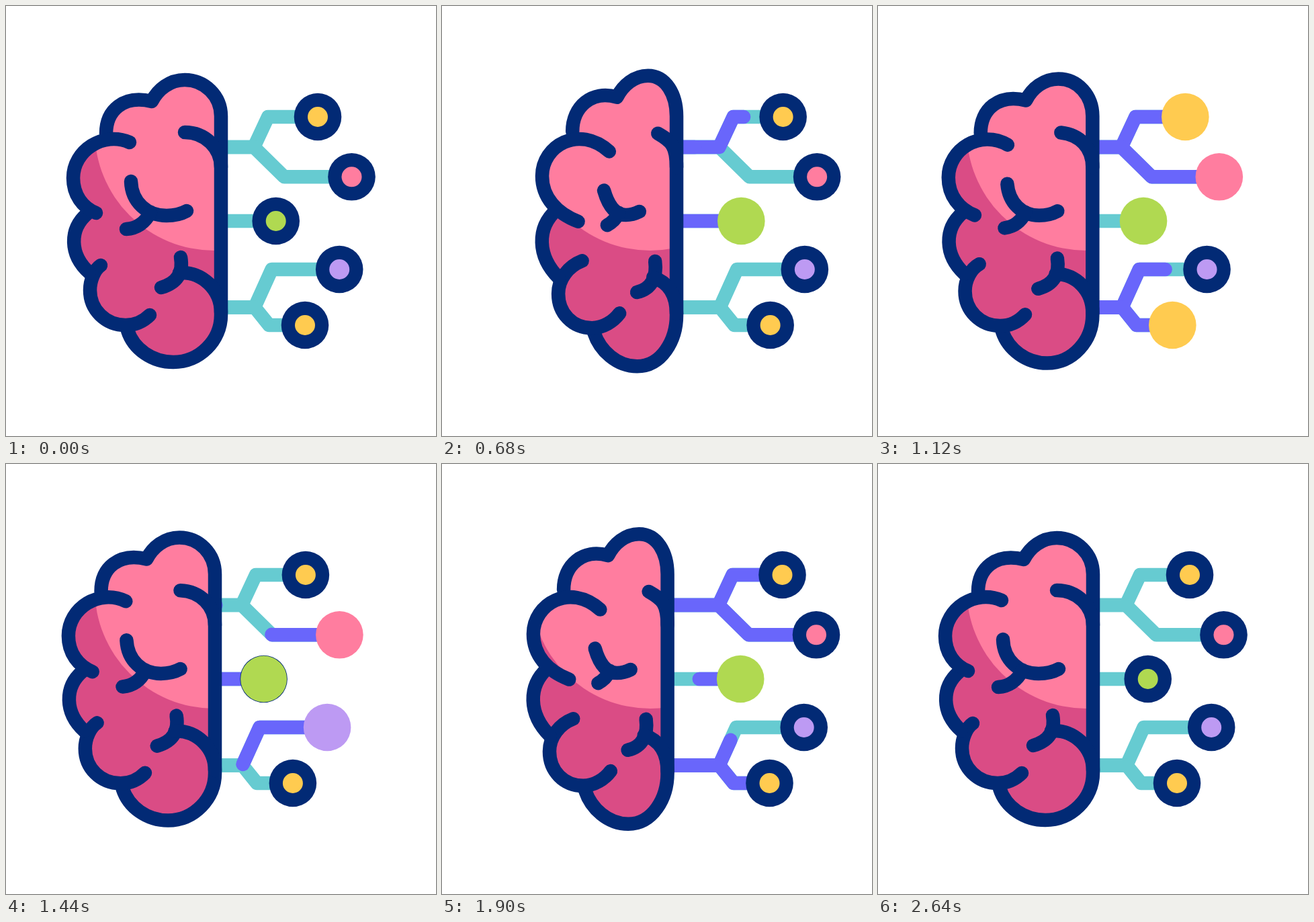
Animation, 640 px wide and 640 px high, one loop 2.7 s. Source, as an HTML page with a canvas:

```html
<!DOCTYPE html>
<html lang="en">
<head>
<meta charset="utf-8">
<title>Brain circuit</title>
<style>
  html, body { margin: 0; width: 100%; height: 100%; overflow: hidden; background: #fff; }
  canvas { display: block; width: 100vmin; height: 100vmin; }
</style>
</head>
<body>
<canvas id="stage" width="640" height="640"></canvas>
<script>
const ctx = document.getElementById('stage').getContext('2d');
const LOOP = 2700, PULSE_GAP = 870, LINE = 20.5;
const NAVY = '#022a75', TEAL = '#66cbd1', PURPLE = '#6966fb';
const PINK = '#ff7d9f', DARK_PINK = '#da4c85', YELLOW = '#ffcb50';

// Each stroke in three poses (rest, tall, narrow), with the spine at x = 320.
// The first four follow one another clockwise around the outline.
const strokes = [
  ['M149 190C149 155 175 132 217 142C226 124 244 110 266 110C296 110 320 134 320 164L320 460C320 498 288 530 249 530C218 530 190 511 181 483',
   'M136.5 180C136 146 162 116 209.5 127C219 108 237 93.5 261 93.5C289 93.5 320 132 320 164L320 460C320 495 286 546.5 242 546.5C210 546.5 178 521 171 492',
   'M166 187C166 150 195 125 232 136C241 118 258 104 278 104C305 104 320 132 320 164L320 460C320 498 298 536 262 536C232 536 207 513 198 486'],
  ['M214 460C204 470 193 475 178 475C148 475 125 452 125 423C125 408 132 392 141 386',
   'M208.5 469C198 480 182 487 165.5 487C136 487 112.5 463 112.5 433C112.5 415 121 398 135.5 388',
   'M236 457C227 469 212 479 195 479C166 479 145 457 145 428C145 406 160 387 181 379'],
  ['M124 397C94 370 94 332 121 309',
   'M111 406C80 375 80 330 106 302',
   'M146 405C113 372 113 330 142 304'],
  ['M134 308C114 300 100 281 100 256C100 215 145 186 184 203',
   'M128.5 312C103 302 86 277 86 250C86 206 138 175 181.5 200',
   'M175 321C143 309 121 285 121 253C121 208 176 176 221 217'],
  ['M266 188C297 188 320 212 320 240',
   'M265.5 179C294 183 320 206 320 240',
   'M293 190C313 202 320 208 320 240'],
  ['M186 261C187 292 210 312 239 312C250 312 260 310 269 305',
   'M180 261C183 292 204 312 231.5 312C242 312 251 309 259.5 304',
   'M213 275C219 295 228 311 245 311C252 311 259 309 265 306'],
  ['M215 307C207 323 194 331 179 332',
   'M211 307C204 322 192 330 176 331',
   'M235 308C231 316 225 322 218 326'],
  ['M260 374C264 397 255 412 231 419',
   'M259.5 379C263 404 254 421 229.5 429',
   'M289 380C292 403 284 421 262 426'],
  ['M258 397C292 395 320 422 320 456',
   'M258 405C295 409 320 428 320 460',
   'M286 404C308 411 320 430 320 458']
];
const NUMBER = /[\d.]+/g;
const morphs = strokes.map(poses => ({
  shape: poses[0],
  values: poses.map(path => path.match(NUMBER).map(Number))
}));

// Wires end in a node; grow, light, fade and dim are [start, end] times of a pulse.
const wires = [
  { points: [[290, 210], [369, 210], [390, 165], [464, 165]], color: YELLOW,
    grow: [482, 789], light: [1040, 1110], fade: [1200, 1360], dim: [1340, 1420] },
  { points: [[290, 210], [369, 210], [414, 254.3], [514.5, 254.3]], color: PINK,
    grow: [600, 900], light: [1040, 1110], fade: [1365, 1500], dim: [1500, 1580] },
  { points: [[290, 320], [401.7, 320]], color: '#b0d951',
    grow: [360, 540], light: [500, 580], fade: [960, 1110], dim: [1140, 1220] },
  { points: [[290, 448.4], [370, 448.4], [395.5, 392], [496.2, 392]], color: '#bd9af3',
    grow: [765, 1295], light: [1260, 1330], fade: [1300, 1660], dim: [1640, 1720] },
  { points: [[290, 448.4], [370, 448.4], [391.5, 475], [445, 475]], color: YELLOW,
    grow: [800, 1010], light: [1040, 1110], fade: [1200, 1370], dim: [1350, 1430] }
];
for (const wire of wires) {
  wire.path = new Path2D('M' + wire.points.join('L'));
  wire.length = wire.points.slice(1).reduce((sum, [x, y], i) =>
    sum + Math.hypot(x - wire.points[i][0], y - wire.points[i][1]), 0);
}

// Keys are [time, value].
const brainShift = [[0, 0], [330, -12.5], [720, 30.3], [1320, -11.5], [1970, 16.5], [2645, 0]];
const wireShift = [[0, 0], [250, -9.9], [710, 44.3], [1325, -24.5], [1930, 43], [2645, 0]];
const tallness = [[0, 0], [330, 1], [720, 0]];
const narrowness = [[330, 0], [720, 1], [1320, 0], [1970, 1], [2645, 0]];

function ease(t, [start, end]) {
  const p = Math.min(1, Math.max(0, (t - start) / (end - start)));
  return p * p * (3 - 2 * p);
}

function track(keys, t) {
  return keys.slice(1).reduce((value, [time, next], i) =>
    value + (next - keys[i][1]) * ease(t, [keys[i][0], time]), keys[0][1]);
}

function disc(x, y, radius, color) {
  ctx.fillStyle = color;
  ctx.beginPath();
  ctx.arc(x, y, radius, 0, 2 * Math.PI);
  ctx.fill();
}

function drawWires(t) {
  const pulses = [t, t - PULSE_GAP];
  ctx.save();
  ctx.translate(track(wireShift, t), 0);
  ctx.strokeStyle = TEAL;
  for (const wire of wires) ctx.stroke(wire.path);

  ctx.strokeStyle = PURPLE;
  for (const { path, length, grow, fade } of wires) {
    for (const time of pulses) {
      const head = ease(time, grow) * length, tail = ease(time, fade) * length;
      if (head <= tail) continue;
      ctx.setLineDash([head - tail, 2 * length]);
      ctx.lineDashOffset = -tail;
      ctx.stroke(path);
    }
  }
  ctx.setLineDash([]);

  for (const { points, color, light, dim } of wires) {
    const [x, y] = points[points.length - 1];
    const lit = Math.max(...pulses.map(time => ease(time, light) - ease(time, dim)));
    if (lit < 1) disc(x, y, 35.3, NAVY);
    disc(x, y, 15 + 20.3 * lit, color);
  }
  ctx.restore();
}

function drawBrain(t) {
  const shift = track(brainShift, t);
  const tall = track(tallness, t), narrow = track(narrowness, t);
  const paths = morphs.map(({ shape, values: [rest, high, thin] }) => {
    let i = 0;
    return shape.replace(NUMBER, () => {
      const v = rest[i] + (high[i] - rest[i]) * tall + (thin[i] - rest[i]) * narrow;
      return (i++ % 2 ? v : v + shift).toFixed(2);
    });
  });

  ctx.save();
  ctx.clip(new Path2D('M' + paths.slice(0, 4).map(p => p.slice(1)).join('L') + 'Z'));
  ctx.fillStyle = DARK_PINK;
  ctx.fillRect(0, 0, 640, 640);
  disc(310, 186, 178, PINK);
  ctx.restore();

  ctx.strokeStyle = NAVY;
  for (const path of paths) ctx.stroke(new Path2D(path));
}

function draw(now) {
  const t = now % LOOP;
  ctx.fillStyle = '#fff';
  ctx.fillRect(0, 0, 640, 640);
  ctx.lineWidth = LINE;
  ctx.lineCap = ctx.lineJoin = 'round';
  drawWires(t);
  drawBrain(t);
}

let start;
function frame(now) {
  start ??= now;
  draw(now - start);
  requestAnimationFrame(frame);
}
draw(0);
requestAnimationFrame(frame);
</script>
</body>
</html>
```
